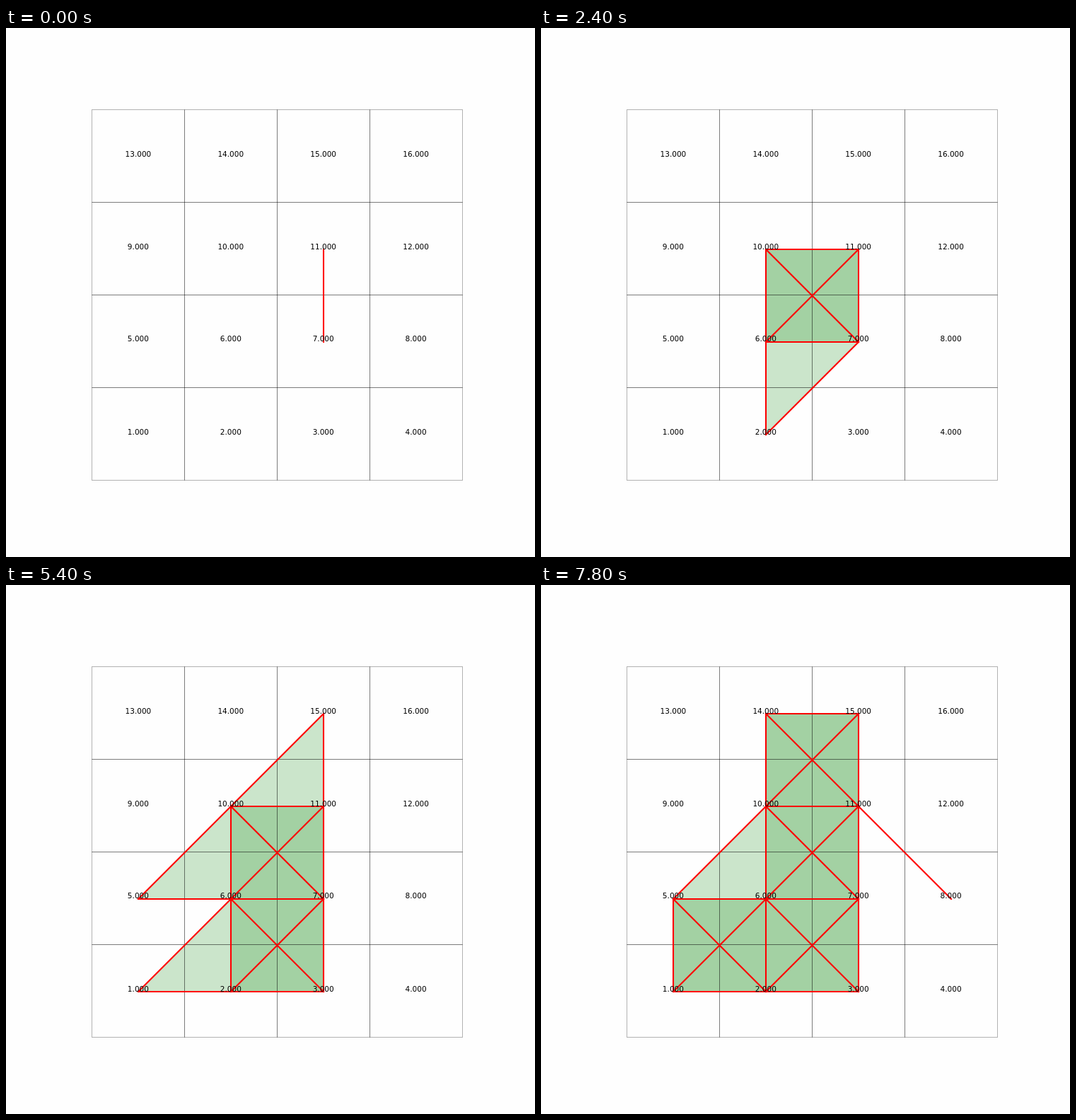
An HTML page for the animation above (8000 ms loop, 748x748 px).

```html
<!DOCTYPE html>
<html lang="en">
<head>
<meta charset="utf-8">
<title>Growing complex on a 4 by 4 grid</title>
<style>
  html, body { margin: 0; width: 100%; height: 100%; overflow: hidden; background: #fefefe; }
  svg { display: block; width: 100vw; height: 100vh; }
  .cell { fill: none; stroke: #000; stroke-opacity: .3; shape-rendering: crispEdges; }
  .tri { fill: #008000; fill-opacity: .2; shape-rendering: crispEdges; }
  .edge { stroke: #f00; stroke-width: 2.08; stroke-linecap: square; }
  text { font: 10.5px "DejaVu Sans", sans-serif; text-anchor: middle; fill: #000; }
</style>
</head>
<body>
<svg viewBox="0 0 748 748">
  <g id="tris"></g><g id="cells"></g><g id="edges"></g><g id="labels"></g>
</svg>
<script>
const STEP = 200, COUNT = 40, N = 4, PITCH = 131;
const gridX = [121.5, 252.5, 383.5, 514.5, 645.5];
const gridY = [115.5, 246.5, 377.5, 508.5, 639.5];
const baseline = [182, 313, 443, 575];

function add(layer, tag, attrs) {
  const el = document.createElementNS("http://www.w3.org/2000/svg", tag);
  for (const key in attrs) el.setAttribute(key, attrs[key]);
  return document.getElementById(layer).appendChild(el);
}

// Vertices count from 1 at the bottom left, row by row upwards.
const col = v => (v - 1) % N;
const row = v => N - 1 - Math.floor((v - 1) / N);
const px = v => 187 + PITCH * col(v);
const py = v => 182 + PITCH * row(v);
const touching = (a, b) =>
  Math.abs(col(a) - col(b)) <= 1 && Math.abs(row(a) - row(b)) <= 1;

// Each new vertex links to its earlier neighbours; a triangle follows
// as soon as its last edge is there.
function buildSimplices(order) {
  const list = [];
  order.forEach((v, i) => {
    const linked = [];
    for (const u of order.slice(0, i).filter(u => touching(u, v))) {
      list.push([v, u]);
      for (const w of linked) if (touching(u, w)) list.push([v, u, w]);
      linked.push(u);
    }
  });
  return list.slice(0, COUNT);
}

function drawSimplex(s) {
  if (s.length === 3) {
    return add("tris", "polygon", {
      class: "tri", points: s.map(v => px(v) + "," + py(v)).join(" ")
    });
  }
  const [a, b] = s;
  return add("edges", "line", { class: "edge", x1: px(a), y1: py(a), x2: px(b), y2: py(b) });
}

for (let v = 1; v <= N * N; v++) {
  const c = col(v), r = row(v);
  add("cells", "rect", {
    class: "cell", x: gridX[c], y: gridY[r],
    width: gridX[c + 1] - gridX[c], height: gridY[r + 1] - gridY[r]
  });
  add("labels", "text", { x: 186.9 + 130.9 * c, y: baseline[r] }).textContent = v.toFixed(3);
}

const shapes = buildSimplices([11, 7, 10, 6, 2, 3, 15, 1, 5, 14, 8]).map(drawSimplex);

function render(ms) {
  const step = Math.floor(ms / STEP) % COUNT;
  shapes.forEach((el, i) => el.setAttribute("visibility", i <= step ? "visible" : "hidden"));
}

const start = performance.now();
function tick() {
  render(performance.now() - start);
  requestAnimationFrame(tick);
}
tick();
</script>
</body>
</html>
```
